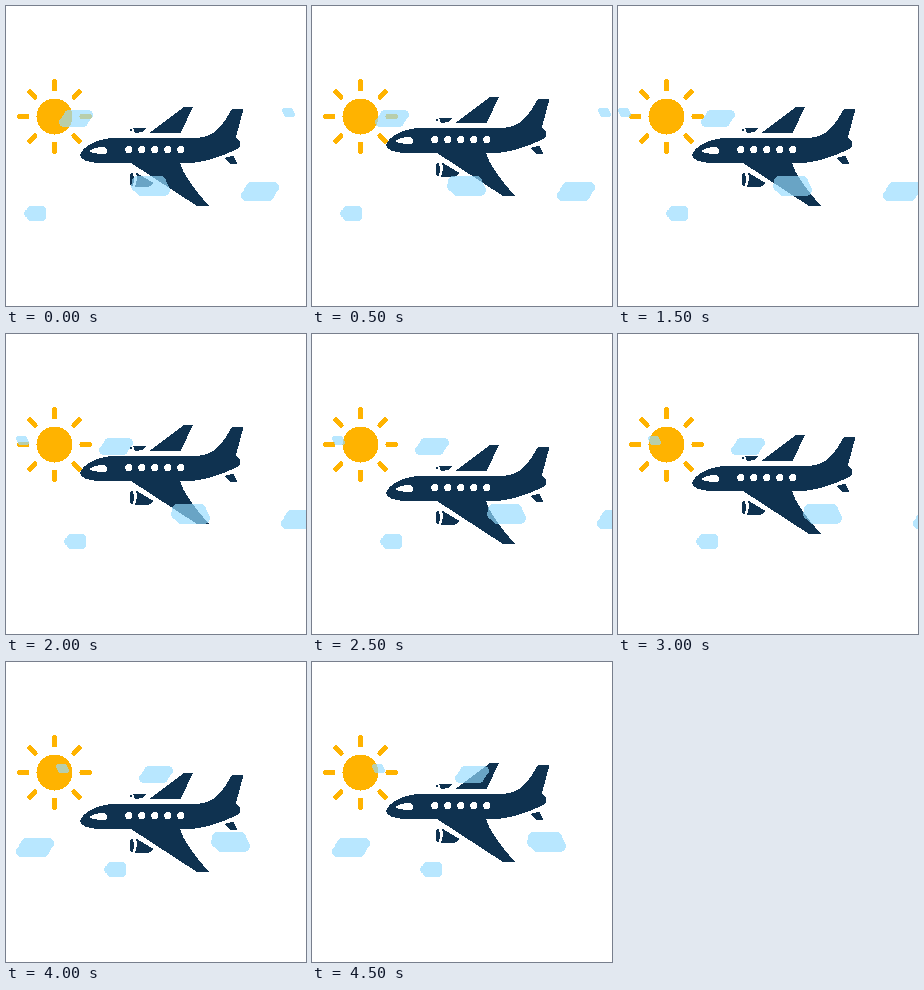
Write an HTML page that moves like this. It is 300 px wide and 300 px high and loops after 5 s.

```html
<!DOCTYPE html>
<html lang="en">
<head>
<meta charset="utf-8">
<title>Plane in the clouds</title>
<style>
  html, body { margin: 0; width: 100%; height: 100%; overflow: hidden; background: #fff; }
  svg { display: block; width: 100%; height: 100%; shape-rendering: crispEdges; }
</style>
</head>
<body>
<svg viewBox="0 0 300 300">
  <g id="sun" fill="#ffb300" stroke="#ffb300" stroke-width="5" stroke-linecap="round">
    <circle cx="48.5" cy="110.5" r="18" stroke="none"/>
  </g>
  <g id="plane" fill="#0f3250">
    <path d="M178 101H187L174.5 127H143.5Z"/>
    <path d="M127 122H140.5L137 126L129 127Z"/>
    <circle cx="125" cy="124.3" r="1.3"/>
    <path d="M74 149C76 141 91 132 110 132H190C208 131 215 122 226 103H237.5L230 131C235 135 235 139 233 142C225 146 205 155.5 185 157H96C83 157 74 154 74 149Z"/>
    <path d="M125 157H174C177 168 188 183 203 200H191Z"/>
    <path d="M130 166.5L147.5 177Q146 181 138 181H129Q132 174 130 166.5Z"/>
    <ellipse cx="125.7" cy="173.5" rx="2.1" ry="7"/>
    <path d="M218 152L227.5 149.5L231.5 158H225Z"/>
    <path d="M83 145C87 141.5 94 140.5 99 141.5Q102 144 101 147Q96 149.5 91 147.5Q86 147.5 83 145Z" fill="#fff"/>
  </g>
  <g id="clouds" fill="#96dcff"></g>
</svg>
<script>
const STEP = 500, STEPS = 10, SHIFT = 10, WIDTH = 300;
const $ = id => document.getElementById(id);

function add(parent, tag, attrs) {
  const el = document.createElementNS('http://www.w3.org/2000/svg', tag);
  for (const key in attrs) el.setAttribute(key, attrs[key]);
  return parent.appendChild(el);
}

for (let angle = 0; angle < 360; angle += 45) {
  add($('sun'), 'path', { d: 'M76 110.5h7.5', transform: `rotate(${angle} 48.5 110.5)` });
}
for (let i = 0; i < 5; i++) {
  add($('plane'), 'circle', { cx: 122.8 + i * 13, cy: 143.7, r: 3.6, fill: '#fff' });
}

// Three stacked bars; lean slants the stack, puff pushes the middle bar out to the left.
function makeCloud(x, y, w, h, lean, puff = 0) {
  const el = add($('clouds'), 'g', { opacity: 0.67 });
  const height = h * 0.58;
  for (let k = 0; k < 3; k++) {
    const slant = Math.abs(lean) * (lean > 0 ? 2 - k : k) / 2;
    const inset = k === 1 ? 0 : puff;
    add(el, 'rect', {
      x: slant + inset, y: k * h * 0.21, height, rx: height / 2,
      width: w - Math.abs(lean) - inset
    });
  }
  return { el, x, y };
}

const clouds = [
  makeCloud(53, 104, 34, 17, 5),
  makeCloud(123, 170, 41, 20, -4, 3),
  makeCloud(235, 176, 38, 19, 5),
  makeCloud(276, 102, 13, 9, -2),
  makeCloud(18, 200, 22, 15, 0, 3)
];

function draw(time) {
  const i = Math.floor(time / STEP) % STEPS;
  const bob = ((2 * i + 1) % 3 - 1) * 10;
  $('plane').setAttribute('transform', `translate(0 ${bob})`);
  for (const { el, x, y } of clouds) {
    let left = x + i * SHIFT;
    // Clouds that leave on the right re-enter flush with the left edge.
    if (left > WIDTH) left = Math.floor((left - WIDTH) / SHIFT) * SHIFT;
    el.setAttribute('transform', `translate(${left} ${y})`);
  }
}

const start = performance.now();
function tick() {
  draw(performance.now() - start);
  requestAnimationFrame(tick);
}
tick();
</script>
</body>
</html>
```
